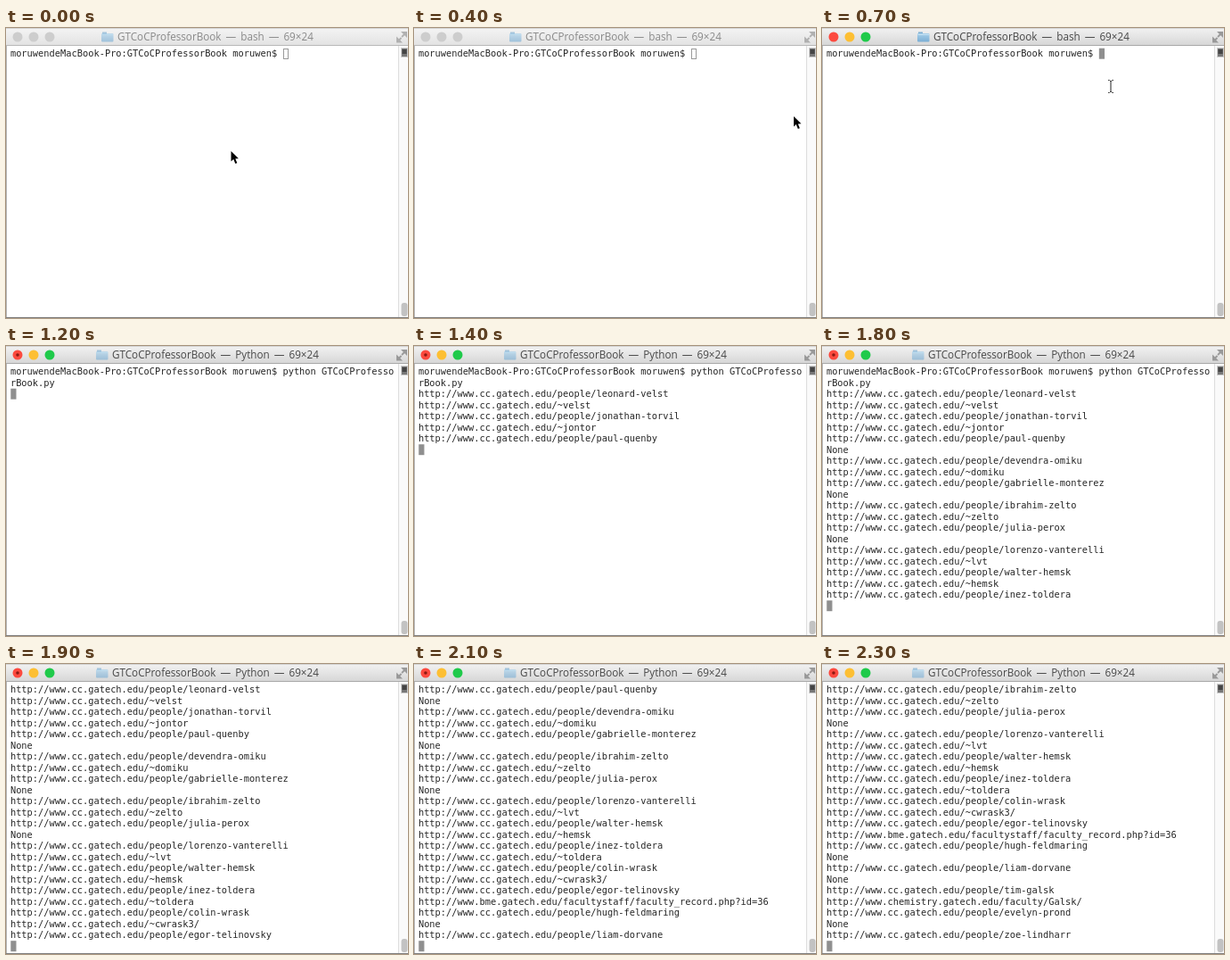
An HTML page with a canvas for the animation above (2.4 s loop, 451 by 325 pixels).

```html
<!DOCTYPE html>
<html lang="en">
<head>
<meta charset="utf-8">
<title>Terminal</title>
<style>
  html, body { margin: 0; width: 100%; height: 100%; overflow: hidden; background: #fff; }
  canvas { display: block; }
</style>
</head>
<body>
<canvas id="stage" width="451" height="325"></canvas>
<script>
const ctx = document.getElementById('stage').getContext('2d');
const LOOP = 2400, STEP = 100;
const COLS = 69, ROWS = 24, CELL_W = 6.235, CELL_H = 12.5, LEFT = 4.9, BASELINE = 32.3;

const user = 'moruwen';
const prompt = `${user}deMacBook-Pro:GTCoCProfessorBook ${user}$ `;
const command = 'python GTCoCProfessorBook.py';

// Personal pages; "-" stands for a missing home page.
const output = `leonard-velst ~velst jonathan-torvil ~jontor paul-quenby - devendra-omiku ~domiku
  gabrielle-monterez - ibrahim-zelto ~zelto julia-perox - lorenzo-vanterelli ~lvt
  walter-hemsk ~hemsk inez-toldera ~toldera colin-wrask ~cwrask3/ egor-telinovsky
  http://www.bme.gatech.edu/facultystaff/faculty_record.php?id=36 hugh-feldmaring -
  liam-dorvane - tim-galsk http://www.chemistry.gatech.edu/faculty/Galsk/
  evelyn-prond - zoe-lindharr`.split(/\s+/).map(entry =>
    entry === '-' ? 'None' :
    entry.startsWith('http') ? entry :
    'http://www.cc.gatech.edu/' + (entry[0] === '~' ? '' : 'people/') + entry);

const FIRST_OUTPUT = 13;
const printed = [3, 5, 9, 11, 15, 19, 23, 25, 27, 31, 33];

function rect(x, y, w, h, color) {
  ctx.fillStyle = color;
  ctx.fillRect(x, y, w, h);
}

function trace(points) {
  ctx.beginPath();
  points.forEach(([x, y]) => ctx.lineTo(x, y));
}

function stroke(points, color, width = 1) {
  trace(points);
  ctx.strokeStyle = color;
  ctx.lineWidth = width;
  ctx.stroke();
}

function fill(points, color) {
  trace(points);
  ctx.fillStyle = color;
  ctx.fill();
}

function disc(x, y, r, color) {
  ctx.beginPath();
  ctx.arc(x, y, r, 0, 7);
  ctx.fillStyle = color;
  ctx.fill();
}

function gradient(y0, y1, top, bottom) {
  const g = ctx.createLinearGradient(0, y0, 0, y1);
  g.addColorStop(0, top);
  g.addColorStop(1, bottom);
  return g;
}

function folder(x, faded) {
  ctx.globalAlpha = faded ? 0.65 : 1;
  rect(x + 1, 4.5, 5, 3, '#7fb0d3');
  ctx.beginPath();
  ctx.roundRect(x, 6, 13.5, 9.5, 1);
  ctx.fillStyle = gradient(6, 15.5, '#a9d0ea', '#7aaed4');
  ctx.fill();
  rect(x + 0.5, 7, 12.5, 1, '#c3e0f2');
  ctx.globalAlpha = 1;
}

function fullScreenIcon(color) {
  fill([[443, 4], [450, 4], [450, 11]], color);
  fill([[438, 9.5], [438, 16.5], [445, 16.5]], color);
  stroke([[448, 6], [444, 10]], color, 1.8);
  stroke([[440, 14.5], [443.5, 11]], color, 1.8);
}

function titleBar(active, running) {
  rect(0, 0, 451, 20, active ? gradient(0, 20, '#f2f2f2', '#d6d6d6') : gradient(0, 20, '#f4f4f4', '#e2e2e2'));
  rect(0, 0, 451, 1, '#d4d4d4');
  rect(0, 19, 451, 1, active ? '#a8a8a8' : '#b8b8b8');

  const lights = active ? ['#fc4a3f', '#fdbf33', '#1fca4a'] : ['#cdcdcd', '#cdcdcd', '#cdcdcd'];
  lights.forEach((color, i) => {
    disc(13 + 18 * i, 10, 5.5, color);
  });
  if (running) disc(13, 10, 1.8, '#8c1a12');

  const x = running ? 119 : 125;
  folder(x - 18, running || !active);
  ctx.font = '11.7px "Open Sans", sans-serif';
  ctx.wordSpacing = '2px';
  ctx.fillStyle = active ? '#484848' : '#8a8a8a';
  ctx.fillText(`GTCoCProfessorBook — ${running ? 'Python' : 'bash'} — 69×24`, x, 14);
  ctx.wordSpacing = '0px';
  fullScreenIcon(active ? '#999' : '#b0b0b0');
}

function scrollBar() {
  rect(440, 20, 11, 304, '#fafafa');
  rect(440, 20, 1, 304, '#dcdcdc');
  rect(443, 22, 8, 11, '#ccc');
  rect(444, 23, 6, 9, '#777');
  rect(444.5, 24, 5, 5, '#444');
  ctx.beginPath();
  ctx.roundRect(443.5, 308, 7, 15, 3);
  ctx.fillStyle = '#c2c2c2';
  ctx.fill();
}

function terminal(step, active) {
  const typed = step < 8 ? 0 : step < 9 ? 9 : command.length;
  const line = prompt + command.slice(0, typed);
  const count = step < FIRST_OUTPUT ? 0 : printed[step - FIRST_OUTPUT];
  let rows = [line.slice(0, COLS)];
  if (line.length > COLS) rows.push(line.slice(COLS));
  if (step >= 11) rows.push(...output.slice(0, count), '');
  rows = rows.slice(-ROWS);

  ctx.font = '10.36px "DejaVu Sans Mono", monospace';
  ctx.fillStyle = '#262626';
  rows.forEach((text, row) => [...text].forEach((char, col) =>
    ctx.fillText(char, LEFT + col * CELL_W, BASELINE + row * CELL_H)));

  const x = LEFT + 0.4 + rows.at(-1).length * CELL_W;
  const y = 22.7 + (rows.length - 1) * CELL_H;
  if (active) {
    rect(x, y, 6.2, 12, '#8f8f8f');
  } else {
    ctx.strokeStyle = '#999';
    ctx.lineWidth = 1;
    ctx.strokeRect(Math.round(x) + 0.5, 23.5, 5, 11);
  }
}

function arrow(x, y) {
  trace([[0, 0], [0, 11.5], [2.7, 9], [4.8, 14], [6.8, 13.2], [4.8, 8.4], [8.4, 8.2]]
    .map(([dx, dy]) => [x + dx, y + dy]));
  ctx.closePath();
  ctx.strokeStyle = '#fff';
  ctx.lineWidth = 2;
  ctx.stroke();
  ctx.fillStyle = '#000';
  ctx.fill();
}

function iBeam(x, y) {
  stroke([[x, y - 6], [x, y + 6]], '#444', 1.2);
  for (const s of [-1, 1]) {
    stroke([[x - 3, y + 7 * s], [x - 1.5, y + 7 * s], [x, y + 5.5 * s], [x + 1.5, y + 7 * s], [x + 3, y + 7 * s]], '#444');
  }
}

function draw(now) {
  const step = Math.floor((now % LOOP) / STEP);
  const active = step >= 6;
  rect(0, 0, 451, 325, '#fff');
  terminal(step, active);
  scrollBar();
  titleBar(active, step >= 11);
  rect(0, 20, 1, 305, '#b0b0b0');
  rect(0, 324, 451, 1, '#808080');

  if (step === 0) arrow(252.5, 138);
  else if (step < 6) arrow(426, 99);
  else if (step === 6) iBeam(426, 99);
  else if (step === 7) iBeam(324, 65.5);
}

const start = performance.now();
function tick() {
  draw(performance.now() - start);
  requestAnimationFrame(tick);
}
tick();
</script>
</body>
</html>
```
